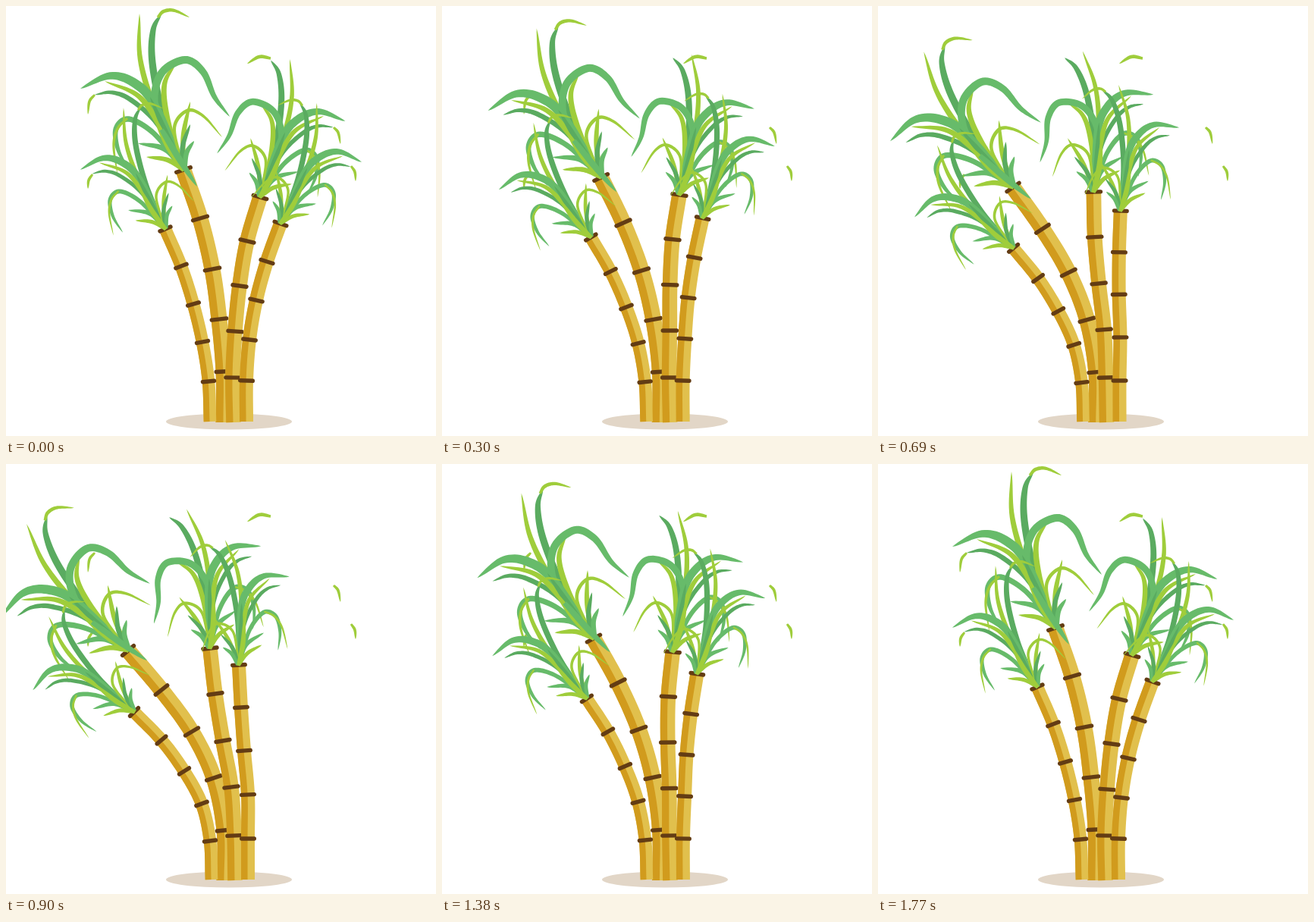
Write an HTML page with a canvas that moves like this. It is 567 px wide and 567 px high and loops after 1.8 s.

```html
<!DOCTYPE html>
<html lang="en">
<head>
<meta charset="utf-8">
<title>Swaying sugarcane</title>
<style>
  html, body { margin: 0; width: 100%; height: 100%; overflow: hidden; background: #fff; }
  canvas { display: block; width: 100vw; height: 100vh; }
</style>
</head>
<body>
<canvas id="stage" width="567" height="567"></canvas>
<script>
const ctx = document.getElementById("stage").getContext("2d");
const GREEN = "#67bb6a", DARK = "#5aab60", LIME = "#9fcd3b";
const LIGHT_CANE = "#e1c04d", DARK_CANE = "#d19b1d", RING = "#633c14";
const LOOP = 1800, STEP = 30, STEPS = LOOP / STEP;

// Catmull-Rom samples through the points, each with its unit normal
function spline(pts, n = 10) {
  const last = pts.length - 1, out = [];
  const at = i => {
    if (i < 0) return [2 * pts[0][0] - pts[1][0], 2 * pts[0][1] - pts[1][1]];
    if (i > last) return [2 * pts[last][0] - pts[last - 1][0], 2 * pts[last][1] - pts[last - 1][1]];
    return pts[i];
  };
  for (let k = 0; k <= last * n; k++) {
    const i = Math.min(Math.floor(k / n), last - 1), t = k / n - i;
    const [a, b, c, d] = [at(i - 1), at(i), at(i + 1), at(i + 2)];
    const pos = j => b[j] + t * (c[j] - a[j]) / 2
      + t * t * (a[j] - 2.5 * b[j] + 2 * c[j] - d[j] / 2)
      + t * t * t * (1.5 * (b[j] - c[j]) + (d[j] - a[j]) / 2);
    const vel = j => (c[j] - a[j]) / 2
      + 2 * t * (a[j] - 2.5 * b[j] + 2 * c[j] - d[j] / 2)
      + 3 * t * t * (1.5 * (b[j] - c[j]) + (d[j] - a[j]) / 2);
    const vx = vel(0), vy = vel(1), len = Math.hypot(vx, vy) || 1;
    out.push({ x: pos(0), y: pos(1), nx: -vy / len, ny: vx / len, u: k / (last * n) });
  }
  return out;
}

// Closed band between two offsets along a spine
function band(spine, from, to) {
  const path = new Path2D();
  const put = (s, f) => path.lineTo(s.x + s.nx * f(s.u), s.y + s.ny * f(s.u));
  spine.forEach(s => put(s, from));
  [...spine].reverse().forEach(s => put(s, to));
  path.closePath();
  return path;
}

const parse = text => text.split(" ").map(p => p.split(",").map(Number));

function blade(color, width, text, kind = "all") {
  const half = u => width * 0.68 * Math.pow(1 - u, 0.7) * (0.5 + 1.2 * u);
  return { color, kind, path: band(spline(parse(text)), half, u => -half(u)) };
}

// One crown, drawn around its foot; the other crowns are scaled or mirrored copies
const FOOT = [234, 216];
const crown = [
  blade(DARK, 7, "231,211 199,155 165,124 140,114 117,117"),
  blade(DARK, 10, "230,206 206,140 193,75 194,32 205,10"),
  blade(LIME, 5, "200,15 208,7 222,6 242,15", "topCurl"),
  blade(LIME, 8, "230,208 196,135 177,70 176,10"),
  blade(LIME, 8, "229,206 212,145 209,103 224,75", "big"),
  blade(GREEN, 11, "224,200 197,135 204,90 236,71 260,87 275,120 295,146", "big"),
  blade(GREEN, 13, "231,210 196,131 170,102 137,92 98,109"),
  blade(LIME, 8, "232,212 204,160 175,119 130,99"),
  blade(GREEN, 8, "229,210 195,168 162,149 145,162 148,190 163,218"),
  blade(LIME, 4, "160,148 147,162 142,185 147,222"),
  blade(DARK, 8, "232,212 212,170 190,120"),
  blade(GREEN, 8, "233,215 210,189 174,181"),
  blade(LIME, 7, "234,216 213,203 185,199"),
  blade(LIME, 5, "231,205 222,160 239,138 260,145 285,173"),
  blade(LIME, 7, "234,213 234,170 243,126"),
  blade(DARK, 7, "234,213 233,185 243,156"),
  blade(GREEN, 7, "236,215 238,194 248,178"),
  blade(LIME, 9, "235,217 214,185 195,145"),
  blade(GREEN, 9, "205,163 228,201 252,238", "front")
];

// Leaf tips that stay in place while the canes sway
const loose = [
  "117,117 110,126 108,143", "114,222 109,230 108,241",
  "432,160 438,167 441,182", "455,211 460,219 461,231"
].map(p => blade(LIME, 4, p)).concat(blade(LIME, 5, "349,69 334,67 318,76"));

// Cane joints from the ground up, upright and fully bent
const canes = [
  { w: 10.5, size: 1, flip: 1, turn: 0, sway: 23, kinds: ["all", "topCurl", "big", "front"],
    rest: "287,549 287,482 281,413 272,347 256,280 234,216",
    bent: "288,549 288,483 274,414 245,353 205,298 161,246" },
  { w: 8.3, size: 0.79, flip: 1, turn: -3.3, sway: 22.8, kinds: ["all", "topCurl"],
    rest: "269,548 267,495 259,443 247,393 231,343 210,294",
    bent: "271,548 269,497 258,448 235,405 205,364 169,327" },
  { w: 9.8, size: 0.87, flip: -1, turn: -3.5, sway: 21.8, kinds: ["all", "big"],
    rest: "300,549 299,490 302,429 308,369 318,310 335,252",
    bent: "302,549 301,490 297,426 286,365 276,303 269,243" },
  { w: 9, size: 0.776, flip: -1, turn: 1, sway: 23, kinds: ["all", "topCurl"],
    rest: "317,548 317,494 321,440 330,388 344,337 362,287",
    bent: "319,548 319,494 319,436 314,378 310,321 307,265" }
].map(c => ({ ...c, rest: parse(c.rest), bent: parse(c.bent),
              leaves: crown.filter(l => c.kinds.includes(l.kind)) }));

function paint(shapes) {
  for (const s of shapes) {
    ctx.fillStyle = s.color;
    ctx.fill(s.path);
  }
}

function drawCane(c, bend) {
  const joints = c.rest.map((p, i) => p.map((v, j) => v + (c.bent[i][j] - v) * bend));
  const n = 10, spine = spline(joints, n);
  const right = () => c.w, left = () => -c.w, seam = () => -c.w * 0.05;
  paint([
    { color: LIGHT_CANE, path: band(spine, left, right) },
    { color: DARK_CANE, path: band(spine, left, seam) }
  ]);

  ctx.strokeStyle = RING;
  ctx.lineWidth = 5.4;
  ctx.lineCap = "round";
  const half = c.w - 0.7;
  for (let i = 1; i < joints.length; i++) {
    const s = spine[i * n];
    ctx.beginPath();
    ctx.moveTo(s.x - s.nx * half, s.y - s.ny * half);
    ctx.lineTo(s.x + s.nx * half, s.y + s.ny * half);
    ctx.stroke();
  }

  const top = joints[joints.length - 1];
  ctx.save();
  ctx.translate(top[0], top[1]);
  ctx.rotate((c.turn - c.sway * bend) * Math.PI / 180);
  ctx.scale(c.size * c.flip, c.size);
  ctx.translate(-FOOT[0], -FOOT[1]);
  paint(c.leaves);
  ctx.restore();
}

function draw(time) {
  const step = Math.floor(time / STEP) % STEPS;
  const bend = step === STEPS - 1 ? 0 : 1 - Math.abs(1 - step / (STEPS / 2));
  ctx.fillStyle = "#fff";
  ctx.fillRect(0, 0, 567, 567);
  ctx.fillStyle = "#e2d6c7";
  ctx.beginPath();
  ctx.ellipse(294, 548, 83, 10.5, 0, 0, 2 * Math.PI);
  ctx.fill();
  paint(loose);
  canes.forEach(c => drawCane(c, bend));
}

const start = performance.now();
function tick() {
  draw(performance.now() - start);
  requestAnimationFrame(tick);
}
tick();
</script>
</body>
</html>
```
